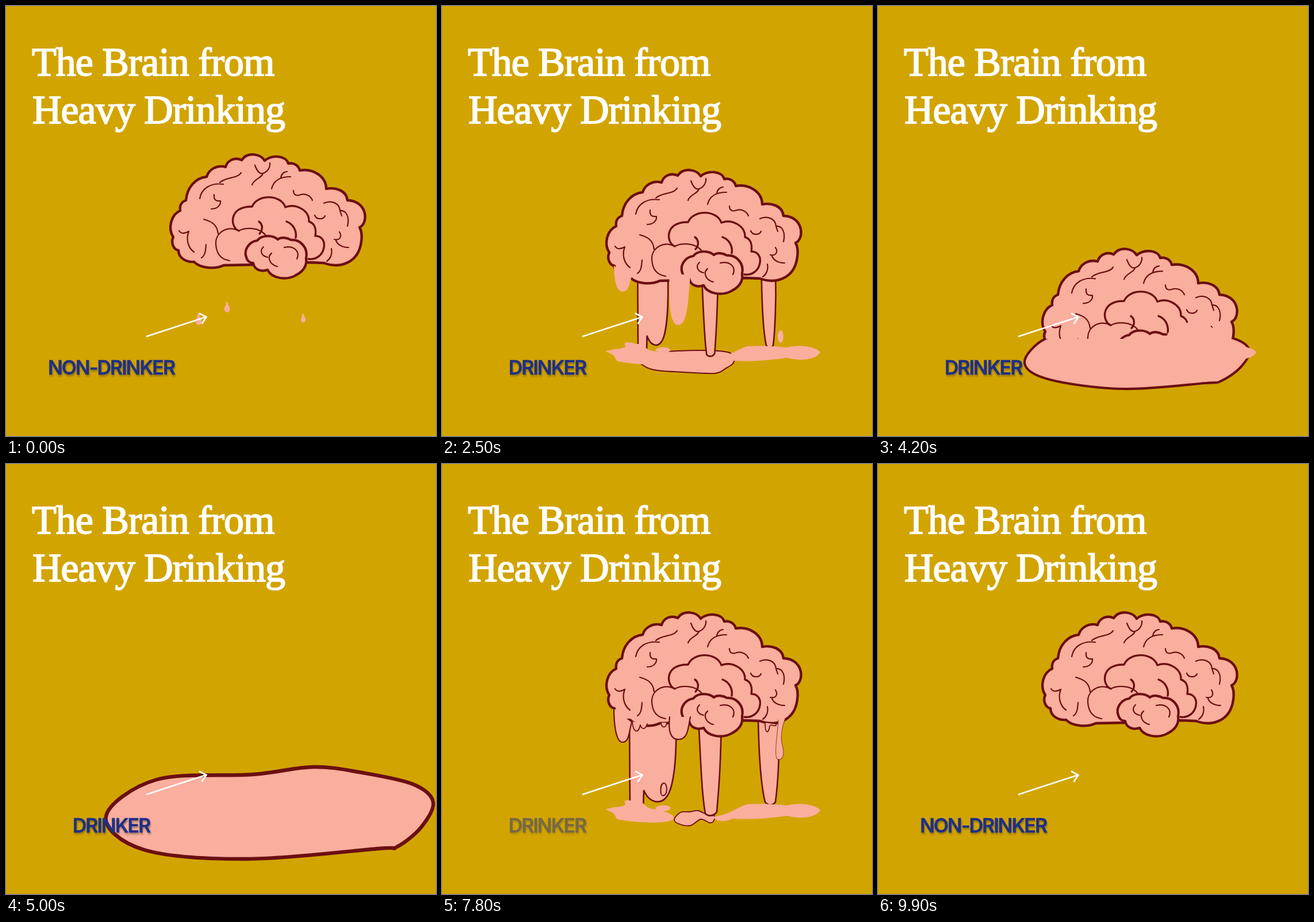
Write an HTML page with a canvas that moves like this. It is 748x748 px and loops after 10000 ms.

```html
<!DOCTYPE html>
<html lang="en">
<head>
<meta charset="utf-8">
<title>The Brain from Heavy Drinking</title>
<style>
html, body { margin: 0; width: 100%; height: 100%; overflow: hidden; background: #d2a400; }
canvas, svg { position: absolute; left: 0; top: 0; width: 748px; height: 748px; }
.title { font: 70px "Liberation Serif", "Times New Roman", serif; letter-spacing: -1px; fill: #fff; stroke: #fff; stroke-width: 1.9px; }
.label { font: 600 34px Inter, sans-serif; letter-spacing: -2px; fill: #1f2f86; stroke: #1f2f86; stroke-width: .4px; text-anchor: middle; filter: drop-shadow(1px 3px 1.5px rgba(70, 60, 30, .45)); }
</style>
</head>
<body>
<canvas id="stage" width="748" height="748"></canvas>
<svg viewBox="0 0 748 748">
  <text class="title" x="45" y="121">The Brain from</text>
  <text class="title" x="46" y="204">Heavy Drinking</text>
  <path d="M244 575L348 541M336 534.5L348.5 541L340.5 553" fill="none" stroke="#fff" stroke-width="2.6"/>
  <text class="label" id="sober" x="183" y="641">NON-DRINKER</text>
  <text class="label" id="drinker" x="183" y="641">DRINKER</text>
</svg>
<script>
const LOOP = 10000, STEP = 100;
const BG = '#d2a400', PINK = '#faae9d', DARK = '#6b0f12';
const ctx = document.getElementById('stage').getContext('2d');
const sober = document.getElementById('sober');
const drinker = document.getElementById('drinker');
const P = d => new Path2D(d);

const brain = P('M303 356C287 363 281 387 291 402C286 412 292 424 300 425C300 438 313 446 327 445' +
  'C339 457 364 458 379 451L432 450L527 446L553 447C580 457 613 448 618 410C620 397 618 390 615 385' +
  'C631 378 629 339 594 338C592 320 572 315 557 318C557 297 535 282 511 286C509 277 500 272 491 274' +
  'C487 260 463 258 450 269C443 257 420 253 410 268C397 262 385 269 382 280C367 276 353 284 349 297' +
  'C330 299 315 315 313 338C304 341 302 349 303 356Z');
const cloud = P('M405 391C390 386 386 348 428 349C437 327 478 327 486 350C504 343 528 355 527 375' +
  'C537 378 540 388 538 400C550 400 555 410 553 420C551 434 538 442 526 440' +
  'M440 375C447 380 447 390 441 396M488 375C500 379 506 392 504 403');
const frontLobe = P('M437 408C423 410 413 424 418 437C420 445 426 447 430 447C432 459 444 463 455 459' +
  'C463 475 488 477 503 469C517 462 524 452 522 439C526 420 512 406 496 407C489 403 478 401 473 406' +
  'C463 398 444 398 437 408Z');
const frontFolds = P('M448 419C442 424 442 434 455 437M462 430C454 436 458 450 472 453M484 420C502 416 512 428 506 440');
const foldsLeft = P('M337 335C340 318 355 307 378 310M372 307C382 297 402 301 409 290' +
  'M362 328C361 337 365 340 373 339C374 347 367 353 357 353' +
  'M301 391C305 397 311 396 318 392C313 405 316 420 327 428M344 371C358 375 367 380 369 396' +
  'M348 415C347 430 345 435 340 438M452 399C440 384 416 385 405 391C385 381 364 394 365 414C366 432 375 441 389 443');
const foldsRight = P('M433 277C437 288 442 293 447 291C455 289 460 280 459 273M447 291C446 299 432 300 428 311' +
  'M462 318C465 305 475 297 495 297M478 299C479 292 484 288 489 288' +
  'M500 321C500 331 508 330 513 328C521 326 530 330 533 338M537 364C540 372 552 372 555 365' +
  'M553 343C566 337 580 343 581 356C592 355 598 367 594 383M581 356L584 365' +
  'M580 393C585 401 581 408 571 406M574 408C577 416 586 420 596 420M566 422C568 432 564 440 558 444');

// Legs: path, pivot x, width once the brain starts to sink
const legs = [
  [P('M326 440L327 598L350 600L351 568C362 592 380 590 388 582C402 570 409 520 407 440'), 367, 0.65],
  [P('M446 440C450 520 452 575 458 608C464 614 474 612 478 605C482 560 485 520 486 440'), 466, 0.7],
  [P('M550 440C551 500 555 560 562 588C568 595 576 594 580 588C584 560 588 500 586 440'), 568, 0.68]
];
// Tongues: path, pivot y, length once the brain starts to sink
const tongues = [
  [P('M299 425C299 450 302 484 314 484C326 484 325 465 330 450'), 425, 0.76],
  [P('M396 440C393 465 398 480 412 479C428 478 428 460 432 440'), 440, 2.25]
];
const drips = P('M331 448C333 470 342 468 345 454C348 463 354 462 357 452M381 450C382 460 390 460 391 450' +
  'M562 450C562 470 568 470 570 456C574 450 578 460 582 453');
const sideDrip = P('M585 445C584 470 577 505 583 513C592 518 597 505 592 490C588 475 592 455 597 443');
const footMark = P('M381 574C378 552 390 550 391 564C391 574 387 579 382 576');
const tear = P('M-2 -10C0 -12 2 -9 2 -5C7 1 7 9 0 10C-7 9 -6 0 -2 -5Z');
const tears = [[335, 545, 1], [384.5, 524, 0.9], [517, 543, 0.75]];

const pools = [
  [P('M284 601C300 595 312 598 320 592C312 584 325 583 338 588C352 586 352 596 362 599C385 604 405 608 403 617' +
    'C395 628 330 623 311 619C296 618 310 609 284 601Z'), 340, 605],
  [P('M371 599C376 592 392 592 398 598C394 606 376 606 371 599Z'), 384, 599],
  [P('M470 614C500 610 508 600 530 592C560 590 580 592 600 594C620 588 650 592 658 602C652 616 620 618 600 612' +
    'C570 616 540 619 505 617C490 624 480 622 470 614Z'), 570, 605]
];

// Outlines of the growing puddle, clockwise from the left end
const puddles = [
  [404,618, 415,606, 430,605, 445,603, 455,607, 465,612, 474,612, 472,622, 465,624, 450,618, 432,629, 412,626],
  [342,615, 370,603, 410,600, 450,599, 480,600, 500,603, 508,612, 506,622, 494,630, 475,639, 420,637, 365,632],
  [272,621, 301,579, 360,568, 450,568, 540,568, 600,579, 615,602, 595,635, 562,650, 535,656, 400,660, 310,646],
  [252,620, 291,578, 370,566, 450,566, 540,566, 618,577, 651,598, 636,628, 602,653, 575,656, 430,667, 295,650],
  [174,613, 262,549, 430,540, 535,527, 620,537, 708,557, 743,588, 722,632, 680,666, 648,669, 420,687, 240,671]
];
const puddleLine = [1.8, 2, 3.6, 4.2, 6.4];
const sinkBy = [0, 27, 148, 167, 300];
const meltKeys = [[2300, 0], [2500, 1], [3300, 2], [4350, 3], [4900, 4], [5650, 4], [6600, 3.05],
  [6900, 3], [7250, 2], [7650, 1], [7800, 0]];

const mix = (a, b, k) => a + (b - a) * k;
const ramp = (t, a, b) => Math.min(1, Math.max(0, (t - a) / (b - a)));
const smooth = k => k * k * (3 - 2 * k);

function along(keys, t) {
  if (t <= keys[0][0]) return keys[0][1];
  for (let i = 1; i < keys.length; i++) {
    const [a, u] = keys[i - 1], [b, v] = keys[i];
    if (t <= b) return mix(u, v, ramp(t, a, b));
  }
  return keys[keys.length - 1][1];
}

function at(list, m) {
  const i = Math.min(list.length - 2, Math.floor(m));
  return mix(list[i], list[i + 1], m - i);
}

// Scales a path about (x, y) and moves it down, keeping line weights
function warp(path, x, y, sx, sy, down = 0) {
  const out = new Path2D();
  out.addPath(path, new DOMMatrix([sx, 0, 0, sy, x - x * sx, y - y * sy + down]));
  return out;
}

function fill(path) {
  ctx.fillStyle = PINK;
  ctx.fill(path);
}

function line(path, width, alpha = 1) {
  ctx.globalAlpha = alpha;
  ctx.strokeStyle = DARK;
  ctx.lineWidth = width;
  ctx.stroke(path);
  ctx.globalAlpha = 1;
}

function oval(x, y, rx, ry) {
  const path = new Path2D();
  path.ellipse(x, y, rx, ry, 0, 0, Math.PI * 2);
  fill(path);
}

function loopPath(v) {
  const n = v.length / 2, path = new Path2D();
  const pt = i => { const j = (i + n) % n * 2; return [v[j], v[j + 1]]; };
  path.moveTo(v[0], v[1]);
  for (let i = 0; i < n; i++) {
    const [a, b, c, d] = [pt(i - 1), pt(i), pt(i + 1), pt(i + 2)];
    path.bezierCurveTo(b[0] + (c[0] - a[0]) / 6, b[1] + (c[1] - a[1]) / 6,
      c[0] - (d[0] - b[0]) / 6, c[1] - (d[1] - b[1]) / 6, c[0], c[1]);
  }
  path.closePath();
  return path;
}

function drawPuddle(m, spread) {
  if (spread <= 0) return;
  const i = Math.min(3, Math.floor(m));
  const shape = loopPath(puddles[i].map((v, j) => mix(v, puddles[i + 1][j], m - i)));
  const path = warp(shape, 440, 615, spread, spread);
  fill(path);
  line(path, at(puddleLine, m));
}

function drawBrain(sink) {
  ctx.save();
  ctx.translate(0, sink);
  fill(brain);
  line(brain, 4.4);
  line(foldsLeft, 2.2);
  line(foldsRight, 2.2);
  line(cloud, 3.4);
  fill(frontLobe);
  line(frontLobe, 4.2);
  line(frontFolds, 2.2);
  ctx.restore();
}

function drawLegs(sink, thin, grow) {
  const len = (145 - sink) / 145 * grow;
  if (len <= 0.02) return;
  for (const [path, x, slim] of legs) {
    const leg = warp(path, x, 455, mix(1, slim, thin), len, sink);
    fill(leg);
    line(leg, 2.6);
  }
  if (grow === 1 && thin < 1) line(footMark, 2, 1 - thin);
}

function drawTongues(sink, thin, grow) {
  if (grow <= 0) return;
  for (const [path, y, reach] of tongues) {
    const tongue = warp(path, 0, y, 1, mix(1, reach, thin) * grow, sink);
    fill(tongue);
    line(tongue, 2.2, 1 - thin);
  }
  if (thin >= 1) return;
  const small = warp(drips, 0, 450, 1, grow, sink);
  const side = warp(sideDrip, 0, 445, 1, grow, sink);
  ctx.globalAlpha = 1 - thin;
  fill(small);
  fill(side);
  line(small, 1.8, 1 - thin);
  line(side, 1.2, (1 - thin) * 0.6);
}

function drawTears(t) {
  if (t >= 300) return;
  for (const [x, y, size] of tears) {
    ctx.save();
    ctx.translate(x, y + t * 0.15);
    ctx.scale(size, size);
    fill(tear);
    ctx.restore();
  }
}

function draw(t) {
  const melt = along(meltKeys, t);
  const sink = at(sinkBy, melt);
  const thin = Math.min(1, melt);
  const grow = smooth(ramp(t, 100, 1300) * (1 - ramp(t, 8500, 9800)));
  const spread = smooth(ramp(t, 1000, 2200) * (1 - ramp(t, 7800, 8800)));

  ctx.fillStyle = BG;
  ctx.fillRect(0, 0, 748, 748);
  ctx.lineJoin = ctx.lineCap = 'round';

  drawPuddle(melt, spread);
  drawLegs(sink, thin, grow);
  if (spread > 0) for (const [path, x, y] of pools) fill(warp(path, x, y, spread, spread));

  ctx.save();
  ctx.beginPath();
  ctx.rect(0, 0, 748, mix(579, 538, ramp(sink, 167, 300)));
  ctx.clip();
  drawBrain(sink);
  drawTongues(sink, thin, grow);
  // Folds dissolve where the brain meets the puddle
  const soft = ramp(melt, 1.4, 2);
  oval(548, 584, 48 * soft, 34 * soft);
  ctx.restore();

  if (melt > 0.3 && melt < 1.6) oval(589, mix(485, 575, thin), 5, 11);
  drawTears(t);

  sober.style.opacity = 1 - ramp(t, 1900, 2100) + ramp(t, 7900, 8100);
  drinker.style.opacity = ramp(t, 2100, 2300) * (1 - ramp(t, 7700, 7900));
}

const start = performance.now();
function tick() {
  const t = (performance.now() - start) % LOOP;
  draw(Math.floor(t / STEP) * STEP);
  requestAnimationFrame(tick);
}
draw(0);
requestAnimationFrame(tick);
</script>
</body>
</html>
```
